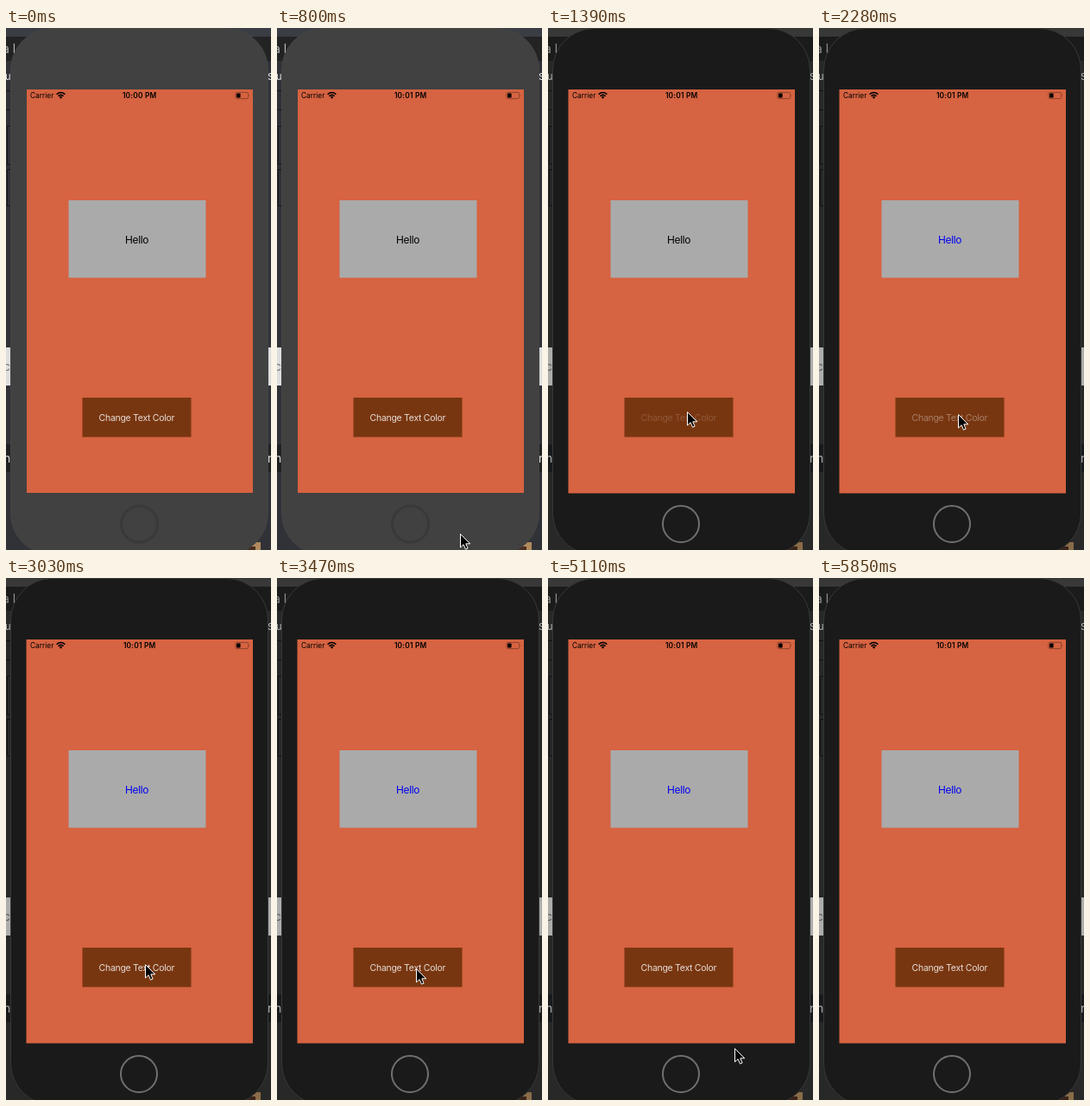
These frames come from a looping animation (307x603 px, 8000 ms). An HTML page:

```html
<!DOCTYPE html>
<html lang="en">
<head>
<meta charset="utf-8">
<title>Change text color</title>
<style>
  html, body { margin: 0; width: 100%; height: 100%; overflow: hidden; background: #303136; }
  svg { display: block; width: 100%; height: 100%; }
  text { font-family: Inter, "Liberation Sans", sans-serif; }
  .mid { text-anchor: middle; }
  .desk text { font-size: 14px; fill: #b8b8b8; }
  .desk .small { font-size: 11px; fill: #eee; }
</style>
</head>
<body>
<svg viewBox="0 0 307 603" preserveAspectRatio="none">
  <g class="desk">
    <rect id="desk" width="307" height="603"/>
    <rect id="bar" width="307" height="10"/>
    <rect y="10" width="307" height="28" fill="#232324"/>
    <g fill="none" stroke="#17171a">
      <rect x="-20.5" y="72.5" width="26" height="22"/>
      <rect x="1.5" y="113.5" width="302" height="44"/>
      <rect x="1.5" y="163.5" width="20" height="42"/>
    </g>
    <rect y="369" width="307" height="44" fill="#dedede"/>
    <rect y="481" width="307" height="32" fill="#202122"/>
    <rect x="270" y="594" width="25" height="9" fill="#b08a5c"/>
    <rect x="270" y="599" width="19" height="4" fill="#4a2c20"/>
    <text x="-4" y="29">a l</text>
    <text class="small" x="-1" y="60">ul</text>
    <text class="small" x="303" y="60">S</text>
    <text x="-3" y="396" style="fill:#777">c</text>
    <text x="-7" y="502" style="fill:#ddd">m</text>
    <text x="303" y="502" style="fill:#ddd">r</text>
    <rect id="shade" width="307" height="603"/>
  </g>

  <rect id="body" x="5.5" y="0.5" width="298" height="608" rx="48"/>
  <circle id="home" cy="573" r="21"/>
  <rect id="screen" y="71" fill="#d66341"/>

  <text x="28" y="81.2" font-size="8.4">Carrier</text>
  <g fill="none" stroke="#000" stroke-width="1.5">
    <path d="M58.6 76.6Q63.5 72.4 68.4 76.6M60.4 78.7Q63.5 76 66.6 78.7"/>
    <path d="M61.7 79.7Q63.5 78.3 65.3 79.7L63.5 81.8Z" fill="#000" stroke="none"/>
  </g>
  <text id="clock" class="mid" x="154.7" y="81.2" font-size="8.4" font-weight="600" letter-spacing=".2"></text>
  <rect x="265.9" y="74.4" width="14.8" height="7.2" rx="1.8" fill="none" stroke="#7d3b27" stroke-width=".8"/>
  <rect x="267" y="75.5" width="4.6" height="5" rx=".8"/>
  <path d="M281.7 76.7q1.1 1.3 0 2.6z" fill="#7d3b27"/>

  <rect x="72.5" y="199" width="159" height="89.5" fill="#aaa"/>
  <text id="hello" class="mid" x="151.6" y="248.6" font-size="11.9" letter-spacing="-.3">Hello</text>
  <rect x="88.5" y="427" width="126" height="45.5" fill="#783610"/>
  <text id="label" class="mid" x="151.4" y="454" font-size="10.5" letter-spacing="-.28" fill="#e6dcd6">Change Text Color</text>

  <path id="cursor" d="M.5 .6V16L4.1 12.7L6.5 18.2L9.1 17.1L6.8 11.8H11.8Z" fill="#000" stroke="#fff" stroke-linejoin="round"/>
</svg>
<script>
  const LOOP = 8000;
  const TICK = 148.6, FIRST = 494;
  const PRESS = 6, RELEASE = 9, FADE_START = 10, FADE_TICKS = 7;

  // Pointer stops: tick, x, y
  const stops = [
    [1, 222, 610], [5, 161, 442], [9, 161, 446], [17, 161, 446], [20, 161, 451],
    [22, 161, 470], [25, 169, 444], [28, 169, 444], [33, 242, 597], [36, 240, 620]
  ];

  const clamp = v => Math.min(1, Math.max(0, v));
  const ease = v => v * v * (3 - 2 * v);
  const mix = (a, b, v) => a + (b - a) * v;
  const el = id => document.getElementById(id);
  const set = (id, attrs) => {
    for (const k in attrs) el(id).setAttribute(k, attrs[k]);
  };

  function pointer(n) {
    const i = Math.max(1, stops.findIndex(s => s[0] >= n));
    const to = n > stops.at(-1)[0] ? stops.at(-1) : stops[i];
    const from = stops[i - 1];
    const v = ease(clamp((n - from[0]) / (to[0] - from[0])));
    return [mix(from[1], to[1], v), mix(from[2], to[2], v)];
  }

  function labelOpacity(n) {
    return n < PRESS ? 1 : mix(.2, 1, clamp((n - FADE_START) / FADE_TICKS));
  }

  function draw(t) {
    const n = Math.floor((t - FIRST) / TICK);
    const active = n >= PRESS;
    const [x, y] = pointer(n);
    set('desk', { fill: active ? '#333334' : '#313238' });
    set('bar', { fill: active ? '#484848' : '#3a3e44' });
    set('shade', { opacity: active ? .22 : 0 });
    set('body', active ? { fill: '#1a1a1a', stroke: '#383838' } : { fill: '#414141', stroke: '#444' });
    set('home', active
      ? { cx: 154, fill: '#1a1a1a', stroke: '#707070', 'stroke-width': 2 }
      : { cx: 154.5, fill: '#414141', stroke: '#393939', 'stroke-width': 3 });
    set('screen', active
      ? { x: 23.5, width: 262.5, height: 466.5 }
      : { x: 24, width: 262, height: 466 });
    el('clock').textContent = n < 0 ? '10:00 PM' : '10:01 PM';
    set('hello', { fill: n < RELEASE ? '#000' : '#0000f0' });
    set('label', { opacity: labelOpacity(n) });
    set('cursor', { transform: `translate(${Math.round(x)} ${Math.round(y)})` });
  }

  const start = performance.now();
  function run() {
    draw((performance.now() - start) % LOOP);
    requestAnimationFrame(run);
  }
  run();
</script>
</body>
</html>
```
